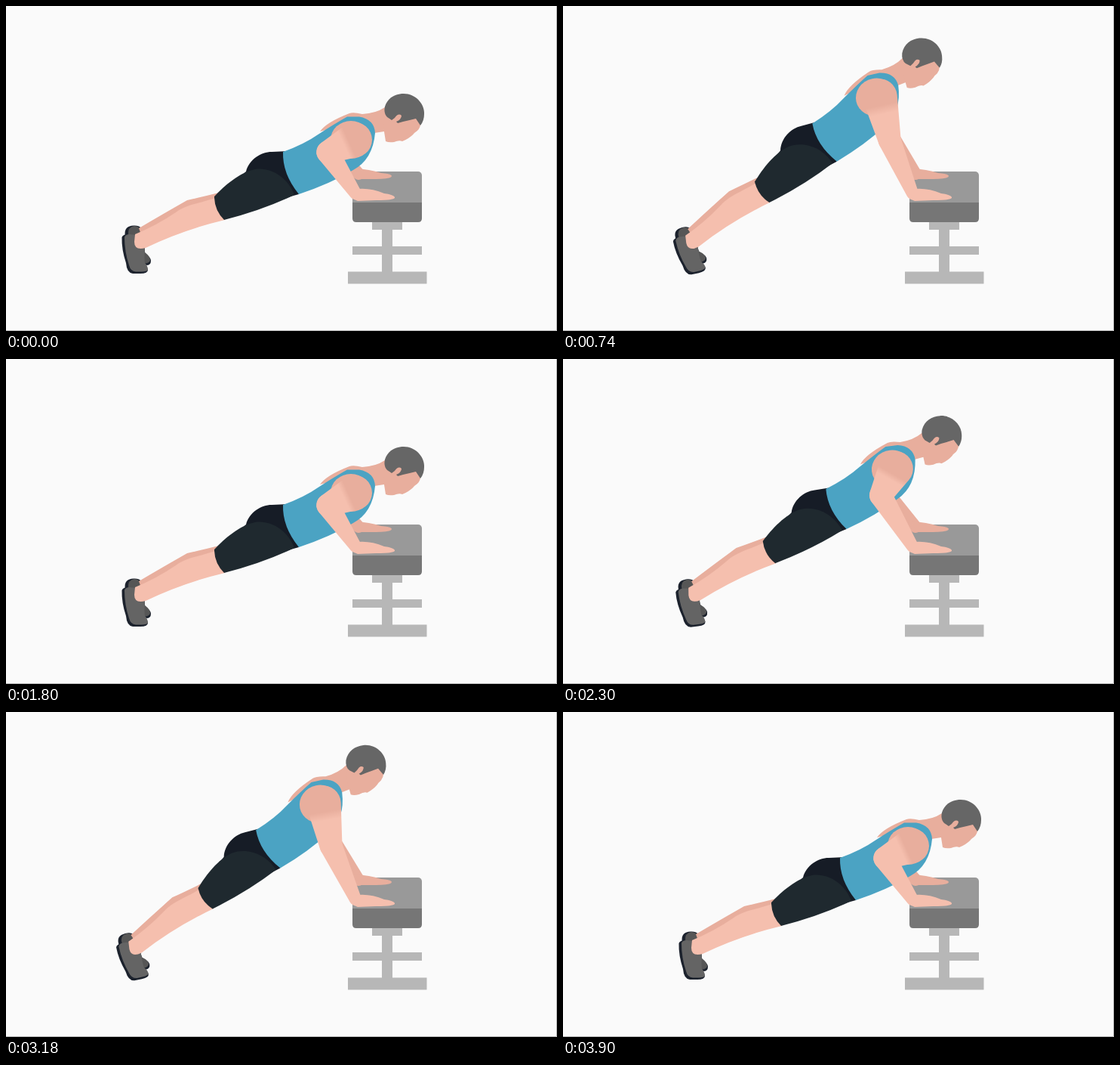
Write an HTML page that moves like this. It is 730x430 px and loops after 3920 ms.

```html
<!DOCTYPE html>
<html lang="en">
<head>
<meta charset="utf-8">
<title>Incline push-up</title>
<style>
  html, body { margin: 0; width: 100%; height: 100%; overflow: hidden; background: #fafafa; }
  svg { display: block; width: 100vw; height: 100vh; }
  .light { fill: #f5bfae; }
  .shade { fill: #e8ae9d; }
  .sole { fill: #1c222d; }
</style>
</head>
<body>
<svg viewBox="0 0 730 430">
  <defs>
    <linearGradient id="upperSkin" gradientUnits="userSpaceOnUse">
      <stop offset=".2" stop-color="#e8ae9d"/>
      <stop offset=".4" stop-color="#f5bfae"/>
    </linearGradient>
  </defs>
  <path d="M0 429.5H729.5V0" fill="none" stroke="#b4b4b4"/>

  <g id="bench">
    <path d="M485 284H525V296H512V318H551V329H512V351.500H557.500V367.500H453V351.500H498V329H459V318H498V296H485Z" fill="#b7b7b7"/>
    <rect x="459" y="219" width="92" height="60" rx="5" fill="#999"/>
    <path d="M459 260H551V281Q551 286 546 286H464Q459 286 459 281Z" fill="#767676"/>
  </g>

  <g class="shade">
    <path id="farUpper"/>
    <path id="farLower"/>
    <path d="M462 215Q482 216 497 221Q511 222 511 225Q511 229 490 229H468Z"/>
  </g>

  <g id="body">
    <g id="farLeg">
      <path class="sole" d="M158 306C156 294 161 291 169 290.500C178 290 181 294 182 303L184 326C186 330 192 332 192 337Q192 343 186 343L165 335Z"/>
      <path fill="#565656" d="M162 303Q161 292 170 291Q179 291 181 303L184 326Q192 332 191 337Q189 341 180 341Z"/>
      <path class="shade" d="M176 294Q210 274 240 257Q258 253 282 247L285 262L180 305Z"/>
    </g>
    <g id="nearLeg">
      <path class="sole" d="M153.500 306Q155 302 162 302L188 349Q188 354 178 354H168Q160 353 159 340Q153 322 153.500 306Z"/>
      <path fill="#646464" d="M157 306Q158 302 164 302L171 303L184 319Q183 335 184 340Q188 344 188 349Q187 351 180 351.500H172Q165 351 163 343Q157 325 157 306Z"/>
      <path class="light" d="M171 302Q200 290 225 273C240 262 255 262 280 253L290 283Q235 296 185 320Q170 324 170 312Z"/>
    </g>
    <path fill="#161c26" d="M276 254L318 219C322 203 338 193 352 193L374 192L388 249L340 262Z"/>
    <path fill="#1f292f" d="M276 252C290 237 310 220 330 216C352 213 374 228 382 250Q340 270 289 283Q276 270 276 252Z"/>
    <path class="shade" d="M416 166Q424 154 455 142Q460 140 472 143Q490 142 502 134L520 160L501 166L488 168L470 172L440 160Z"/>
    <g id="head">
      <path class="shade" d="M503 140L548 145Q552 158 545 165L541 168Q539 171 533 175Q530 177 525 179Q521 177 514 180Q507 181 503 179L500 160Z"/>
      <path fill="#666" d="M505 147Q500 142 502 133C506 121 516 116 527 116C543 116 555 130 554 143Q554 152 549 158L543 149Q535 151 526 153L519 155L517 153Q524 150 524 145Q520 141 515 148L511 151Z"/>
    </g>
    <path fill="#4ba3c3" d="M367 193Q395 183 415 169Q435 156 452 146.500H468Q488 150 489 168Q486 203 460 217Q430 235 388 249Q366 222 367 193Z"/>
    <ellipse class="shade" cx="457" cy="177" rx="27" ry="25"/>
  </g>

  <g class="light">
    <path id="nearLower"/>
    <path id="nearUpper" fill="url(#upperSkin)"/>
    <path d="M459 243Q480 239 501 248Q516 250 515 254Q513 257 490 257L466 258Q459 256 456 251Z"/>
  </g>
</svg>
<script>
const LOOP = 3920, RISE = 628, FALL = 562;
const TOE = { x: 175, y: 344 }, TILT = -13.3;

// Shoulders are given in the low pose and turn with the body; wrists stay on the bench.
const arms = [
  { id: 'far', shoulder: { x: 472, y: 192 }, wrist: { x: 467, y: 222 }, reach: 103, flare: 32, radii: [9, 9, 8] },
  { id: 'near', shoulder: { x: 462, y: 177 }, wrist: { x: 463, y: 248 }, reach: 137, flare: 42, radii: [23, 15, 8] }
];

const $ = id => document.getElementById(id);
const polar = (c, r, a) => ({ x: c.x + r * Math.cos(a), y: c.y + r * Math.sin(a) });
const pair = p => `${p.x.toFixed(2)} ${p.y.toFixed(2)}`;

function turn(p, centre, degrees) {
  const dx = p.x - centre.x, dy = p.y - centre.y;
  return polar(centre, Math.hypot(dx, dy), Math.atan2(dy, dx) + degrees * Math.PI / 180);
}

// Outline around two circles, the first one at least as large as the second.
function taper(p, q, r, s) {
  const dx = q.x - p.x, dy = q.y - p.y;
  const a = Math.atan2(dy, dx), b = Math.acos((r - s) / Math.hypot(dx, dy));
  return `M${pair(polar(p, r, a + b))}A${r} ${r} 0 1 1 ${pair(polar(p, r, a - b))}` +
    `L${pair(polar(q, s, a - b))}A${s} ${s} 0 0 1 ${pair(polar(q, s, a + b))}Z`;
}

// The elbow moves outwards as the shoulder comes closer to the wrist.
function elbowOf(shoulder, { wrist, reach, flare }) {
  const dx = wrist.x - shoulder.x, dy = wrist.y - shoulder.y, d = Math.hypot(dx, dy);
  const bend = Math.sqrt(Math.max(0, 1 - (d / reach) ** 2));
  const along = 0.48 - 0.3 * bend, out = flare * bend / d;
  return { x: shoulder.x + dx * along - dy * out, y: shoulder.y + dy * along + dx * out };
}

function drawArm(arm, angle) {
  const shoulder = turn(arm.shoulder, TOE, angle), elbow = elbowOf(shoulder, arm);
  const [top, middle, end] = arm.radii;
  $(arm.id + 'Upper').setAttribute('d', taper(shoulder, elbow, top, middle));
  $(arm.id + 'Lower').setAttribute('d', taper(elbow, arm.wrist, middle, end));
  return { shoulder, elbow };
}

function shadeArm({ shoulder, elbow }) {
  const ends = { x1: shoulder.x, y1: shoulder.y, x2: elbow.x, y2: elbow.y };
  for (const key in ends) $('upperSkin').setAttribute(key, ends[key]);
}

function ease(t, start, length) {
  const k = Math.min(1, Math.max(0, (t - start) / length));
  return (1 - Math.cos(Math.PI * k)) / 2;
}

// One push-up: 0 is the low pose, 1 the high one.
const rep = (t, up, down) => ease(t, up, RISE) - ease(t, down, FALL);

function draw(t) {
  const lift = rep(t, 223, 1171) + rep(t, 1988, 3071), angle = TILT * lift;
  $('body').setAttribute('transform', `rotate(${angle} ${TOE.x} ${TOE.y})`);
  $('head').setAttribute('transform', `rotate(${6 * lift} 560 141)`);
  const [, near] = arms.map(arm => drawArm(arm, angle));
  shadeArm(near);
}

const start = performance.now();
function tick() {
  draw((performance.now() - start) % LOOP);
  requestAnimationFrame(tick);
}
tick();
</script>
</body>
</html>
```
